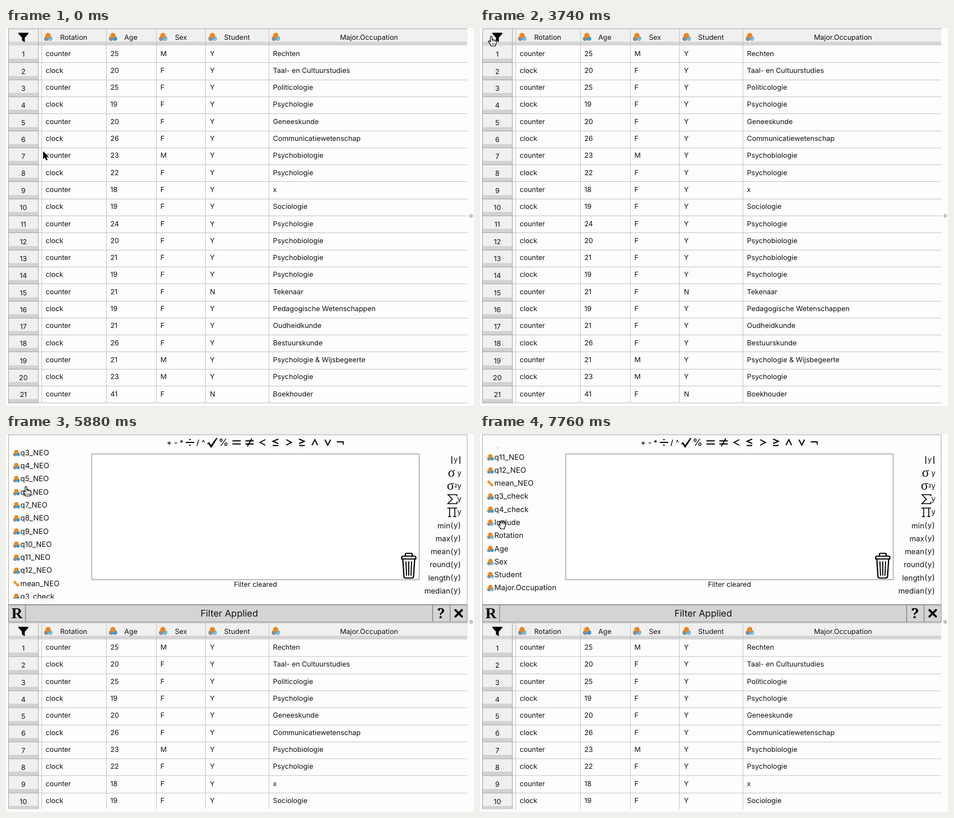
An HTML page for the animation above (8 s loop, 832 px wide and 673 px high).

```html
<!DOCTYPE html>
<html lang="en">
<head>
<meta charset="utf-8">
<title>Filter panel</title>
<style>
  html, body { margin: 0; width: 100%; height: 100%; overflow: hidden; background: #fdfdfd; }
  svg { display: block; width: 832px; height: 673px; }
  text { font-family: Inter, "Open Sans", sans-serif; font-size: 12.45px; fill: #111; text-rendering: geometricPrecision; white-space: pre; }
  .mid { text-anchor: middle; }
  .end { text-anchor: end; }
  .list { font-size: 13.3px; }
  .op { font-weight: 600; font-size: 13px; text-anchor: middle; }
  .serif { font-family: "Liberation Serif", serif; }
  .ink { fill: none; stroke: #000; stroke-width: 1.9; }
  .grid { fill: none; stroke: #c3c3c8; }
  .edge { fill: none; stroke: #a3a3a3; }
</style>
</head>
<body>
<svg viewBox="0 0 832 673">
  <defs>
    <clipPath id="stage"><rect width="832" height="668"/></clipPath>
    <clipPath id="view"><rect x="5" y="24" width="146" height="269"/></clipPath>
    <g id="num">
      <circle cx="-3.2" cy="3.2" r="3.9" fill="#8b8b8b"/>
      <circle cx="3.8" cy="3" r="3.9" fill="#2c9fd6"/>
      <circle cx="0" cy="-2.4" r="4.7" fill="#f08519"/>
    </g>
    <g id="txt">
      <circle cx="-3.2" cy="3.2" r="3.9" fill="#8b8b8b"/>
      <circle cx="3.8" cy="3" r="4" fill="#5fb5de"/>
      <circle cx="0" cy="-2.4" r="4.7" fill="#f08519"/>
      <text x="4" y="6.2" class="mid" style="font-size:8.5px;font-weight:700;fill:#fff;stroke:#2c8fc4;stroke-width:.4">a</text>
    </g>
    <g id="scale">
      <path d="M-5.5-5.5L5.5 5.5" stroke="#f08e1e" stroke-width="5"/>
      <path d="M-2-4.6l-1.6 1.6M1.2-1.4l-1.6 1.6M4.4 1.8l-1.6 1.6" stroke="#f9c98d" stroke-width=".8"/>
    </g>
    <path id="arrow" d="M0 0V14L3.2 11 5.4 16.2 8 15.1 5.8 10.1H10.2Z" stroke="#fff" stroke-width="1.6" paint-order="stroke"/>
    <g id="point" fill="#fff" stroke="#000" stroke-width="1.2" stroke-linejoin="round">
      <path d="M-1.5 10V1.2Q-1.5-.2 0-.2T1.5 1.2V6Q3 5 4 6.5 5.5 5.6 6.5 7.2 8.6 6.4 9 8.6V11.5Q8.6 14 7.5 15V17H-.8V15.5Q-3 13-5 9.5-5.3 7.6-3.4 8Z"/>
      <path d="M1.5 6V9M4 6.5V9M6.5 7.2V9.4M1.4 12V15M3.6 12V15M5.8 12V15" stroke-width=".8"/>
    </g>
    <g id="palm" fill="#fff" stroke="#000" stroke-width="1.2" stroke-linejoin="round">
      <path d="M-3 2L-5-4Q-4.6-6.2-3-5L-1.6-1.5V-6Q-.3-8 1-6L1.2-1.5 2.2-6Q3.8-7.2 4.4-5.4L4 -1 5.2-3.6Q7-4.4 7-2.4L5.8 3Q5.4 5.6 4.4 6.4V8H-2.6V6.6Q-5 4-6.8 1-6.4-.8-4.6 0Z"/>
    </g>
  </defs>
  <g id="table" clip-path="url(#stage)"><g id="sheet"></g></g>
  <g id="panel"></g>
  <circle cx="827" cy="334.5" r="2.8" fill="#c9c9c9" stroke="#a5a5a5" stroke-width=".8"/>
  <use id="cursor"/>
</svg>
<script>
const $ = id => document.getElementById(id);
const text = (x, y, s, cls = '', css = '') =>
  `<text x="${x}" y="${y}" class="${cls}" style="${css}">${s}</text>`;
const rect = (x, y, w, h, attrs) =>
  `<rect x="${x}" y="${y}" width="${w}" height="${h}" ${attrs}/>`;
const path = (d, cls, attrs = '') => `<path d="${d}" class="${cls}" ${attrs}/>`;
const icon = (id, x, y, k = 1) => `<use href="#${id}" transform="translate(${x} ${y}) scale(${k})"/>`;

// Data sheet
const TOP = 31, ROW = 30.3;
const ages = [25, 20, 25, 19, 20, 26, 23, 22, 18, 19, 24, 20, 21, 19, 21, 19, 21, 26, 21, 23, 41];
const majors = ['Rechten', 'Taal- en Cultuurstudies', 'Politicologie', 'Psychologie', 'Geneeskunde',
  'Communicatiewetenschap', 'Psychobiologie', 'Psychologie', 'x', 'Sociologie', 'Psychologie',
  'Psychobiologie', 'Psychobiologie', 'Psychologie', 'Tekenaar', 'Pedagogische Wetenschappen',
  'Oudheidkunde', 'Bestuurskunde', 'Psychologie &amp; Wijsbegeerte', 'Psychologie', 'Boekhouder'];
const heads = [['txt', 74.8, 120.3, 'Rotation'], ['num', 190, 222, 'Age'], ['txt', 279, 311, 'Sex'],
  ['txt', 367, 410.7, 'Student'], ['txt', 479.5, 645.3, 'Major.Occupation']];

function drawSheet() {
  let s = rect(4, 1, 816, 667, 'fill="#fdfdfd"')
    + rect(4, 1.5, 816, 23.5, 'fill="#f0f0f0"')
    + rect(4, 24.5, 816, 6.5, 'fill="#d5d5d5"')
    + rect(4, TOP, 53.5, 636.5, 'fill="#f0f0f0"');
  majors.forEach((major, i) => {
    const y = TOP + i * ROW, base = y + 18.5, end = Math.round(y + ROW) + .5;
    const cells = [i % 2 ? 'clock' : 'counter', ages[i],
      [0, 6, 18, 19].includes(i) ? 'M' : 'F', i === 14 || i === 20 ? 'N' : 'Y', major];
    s += rect(4, end - 7, 53.5, 6.5, 'fill="#d2d2d2"')
      + path(`M57.5 ${end}H820`, 'grid') + path(`M4 ${end}H57.5`, 'edge')
      + text(30.8, base + 1.8, i + 1, 'mid');
    cells.forEach((c, k) => s += text([70.4, 185.4, 274.4, 362.6, 474.6][k], base, c));
  });
  s += path('M63.5 31V667.5M178.5 31V667.5M267.5 31V667.5M354.5 31V667.5M467.5 31V667.5', 'grid')
    + path('M4.5 1V667.5M57.5 1.5V667.5M4 1.5H820', 'edge')
    + path('M63.5 2V31M178.5 2V31M267.5 2V31M354.5 2V31M467.5 2V31', 'grid')
    + '<path d="M22 8.5H39.8Q40.2 10 39 11L33.4 17.2V25.2L28.4 22.2V17.2L22.8 11Q21.6 10 22 8.5Z"/>';
  for (const [id, ix, tx, name] of heads) s += icon(id, ix, 15.8) + text(tx, 21, name, 'mid');
  $('sheet').innerHTML = s;
}

// Filter panel
const STEP = 23.28, FIRST = 43.5;
const seq = (n, f) => Array.from({ length: n }, (_, i) => f(i + 1));
const fields = ['ParticipantNumber', 'Condition', 'q1_check', 'q2_check', ...seq(12, i => `q${i}_NEO`),
  'mean_NEO', 'q3_check', 'q4_check', 'Include', 'Rotation', 'Age', 'Sex', 'Student', 'Major.Occupation'];
const kind = f => /^(Part|mean)/.test(f) ? 'scale' : /^(Inc|Rot|Sex|Stu|Maj)/.test(f) ? 'txt' : 'num';

function drawOperators() {
  const signs = [[290, '+'], [302, '-'], [312, '*'], [341, '/'], [351, '^']];
  const shapes = [
    [327, 'M-7.5 0H7.5M-1.3-5H1.3M-1.3 5H1.3'],
    [410, 'M-7.5-2.7H7.5M-7.5 2.7H7.5'],
    [433, 'M-7.5-2.7H7.5M-7.5 2.7H7.5M4-7L-4 7'],
    [456, 'M5-5L-4.5 0 5 5'],
    [479, 'M5-6L-4.5-2 5 2M-5 5.5H5'],
    [503, 'M-5-5L4.5 0-5 5'],
    [526, 'M-5-6L4.5-2-5 2M-5 5.5H5'],
    [549, 'M-5 5L0-5 5 5'],
    [572, 'M-5-5L0 5 5-5'],
    [594, 'M-6-1H5.5V4']];
  return signs.map(([x, c]) => text(x, 19.8, c, 'op')).join('')
    + text(386.8, 21.3, '%', 'mid', 'font-size:17.5px;font-weight:500')
    + shapes.map(([x, d]) => path(d, 'ink', `transform="translate(${x} 15)"`)).join('')
    + '<path d="M357.5 17L361 14.6 364.6 19.6 374 6.8 376 7.6 365.4 24H363.8L360 17.6 358.2 18.6Z"/>';
}

function drawFunctions() {
  const y = i => 46.3 + STEP * i;
  let s = path('M792.5 39.5V53M806.8 39.5V53', 'ink', 'style="stroke-width:1.5"')
    + text(799.6, y(0) + 4, 'y', 'list mid')
    + text(785.6, y(1) + 6.2, 'σ', 'serif', 'font-size:24px')
    + text(783.8, y(2) + 6.2, 'σ', 'serif', 'font-size:24px')
    + text(797, y(2) + 2, '2', '', 'font-size:8.5px;font-weight:600')
    + path('M801.5 111V108H785.8L793.5 116 785.5 124H801.5V120.5', 'ink', 'style="stroke-width:1.6"')
    + path('M784.5 131.8H802M788.6 132V147M797.8 132V147M785.8 147H791.4M795 147H800.6', 'ink', 'style="stroke-width:1.6"');
  for (let i = 1; i < 5; i++) s += text(802.3, y(i) + 4, 'y', 'list');
  ['min', 'max', 'mean', 'round', 'length', 'median'].forEach((f, i) => {
    const base = y(i + 5) + 4.8;
    s += text(789.8, base, f, 'list end') + text(790.2, base - .3, '(', 'list')
      + text(799.6, base - .6, 'y', 'list mid') + text(803.8, base - .3, ')', 'list');
  });
  return s;
}

function drawPanel() {
  const items = fields.map((f, i) => {
    const y = FIRST + i * STEP;
    return icon(kind(f), 18.4, y + .7, .8) + text(25.5, y + 4.7, f, 'list');
  }).join('');
  $('panel').innerHTML = rect(4.5, 1.5, 815.5, 302, 'fill="#fdfdfd" stroke="#a9a9a9"')
    + drawOperators()
    + `<g clip-path="url(#view)"><g id="list">${items}</g></g>`
    + '<rect id="hover" x="6.7" height="23" rx="8" fill="none" stroke="#4db4e6" stroke-width="1.7"/>'
    + rect(152.5, 35.5, 582, 224, 'fill="#fff" stroke="#858585"')
    + path('M703.5 222.5V219.5Q703.5 217.5 706 217.5H726Q728.5 217.5 728.5 219.5V222.5ZM710 217V213.5Q710 212.5 711.5 212.5H720.5Q722 212.5 722 213.5V217'
      + 'M705.5 223L707.5 253.5Q707.7 256.5 710.5 256.5H721.5Q724.3 256.5 724.5 253.5L726.5 223', 'ink', 'style="stroke-width:2.2"')
    + path('M711 227.5L712 251.5M716 227.5V251.5M721 227.5L720 251.5', 'ink', 'stroke-linecap="round"')
    + text(443.6, 272.3, 'Filter cleared', 'mid')
    + drawFunctions()
    + rect(4.5, 304.5, 815.5, 30, 'fill="#d4d4d4" stroke="#8a8a8a"')
    + path('M34.8 304V335M758.5 304V335M789.5 304V335', '', 'stroke="#7a7a7a" stroke-width="1.2"')
    + text(19.5, 328.2, 'R', 'serif mid', 'font-size:27px;font-weight:700;fill:#000')
    + text(396.8, 325.4, 'Filter Applied', 'mid', 'font-size:16.4px')
    + text(773.5, 328, '?', 'mid', 'font-family:\'Noto Serif\',serif;font-size:25px;font-weight:700;fill:#000')
    + path('M799 313.5L810.5 325M810.5 313.5L799 325', 'ink', 'style="stroke-width:3.8" stroke-linecap="round"');
}

// Timeline: each entry holds until the next one
const LOOP = 8000, OPEN = 4000;
const moves = [[0, 'arrow', 66, 219.5], [270, 'arrow', 92, 304], [530, 'arrow', 121, 250],
  [800, 'arrow', 138, 165], [1060, 'arrow', 153, 104], [1600, 'arrow', 154, 91], [1860, 'arrow', 166, 70],
  [2130, 'arrow', 489, 29], [2400, 'arrow', 515, 23], [2670, 'arrow', 320, 12], [2930, 'arrow', 88, 5],
  [3200, 'arrow', 18, 14], [3470, 'point', 20, 15], [4000, 'arrow', 18, 14.5], [4540, 'arrow', 17.5, 14.5],
  [4810, 'point', 21, 48.5], [5080, 'point', 34, 82.5], [5350, 'point', 35.5, 93.5],
  [6420, 'arrow', 34, 112], [6690, 'point', 36, 112], [6960, 'point', 37, 130],
  [7220, 'point', 38, 150], [7490, 'palm', 39, 161]];
const scrolls = [[0, 0], [5620, 35], [5880, 150], [6150, 245], [6420, 315.5], [6690, 323], [6960, 328.5]];
const hovers = [[0], [5350, 2, 83.5], [5620], [6690, 17, 85.5], [6960, 18, 85.5], [7220, 19, 72], [7760]];
const at = (track, t) => track.findLast(e => e[0] <= t);

function render() {
  const t = performance.now() % LOOP, open = t >= OPEN;
  const [, shape, x, y] = at(moves, t), [, scroll] = at(scrolls, t), [, row, w] = at(hovers, t);
  $('sheet').setAttribute('transform', `translate(0 ${open ? 334.7 : 0})`);
  $('panel').style.display = open ? '' : 'none';
  $('list').setAttribute('transform', `translate(0 ${-scroll})`);
  $('hover').style.display = row === undefined ? 'none' : '';
  if (row !== undefined) {
    $('hover').setAttribute('y', FIRST + row * STEP - scroll - 10.8);
    $('hover').setAttribute('width', w);
  }
  $('cursor').setAttribute('href', '#' + shape);
  $('cursor').setAttribute('transform', `translate(${x} ${y})`);
  requestAnimationFrame(render);
}

drawSheet();
drawPanel();
render();
</script>
</body>
</html>
```
